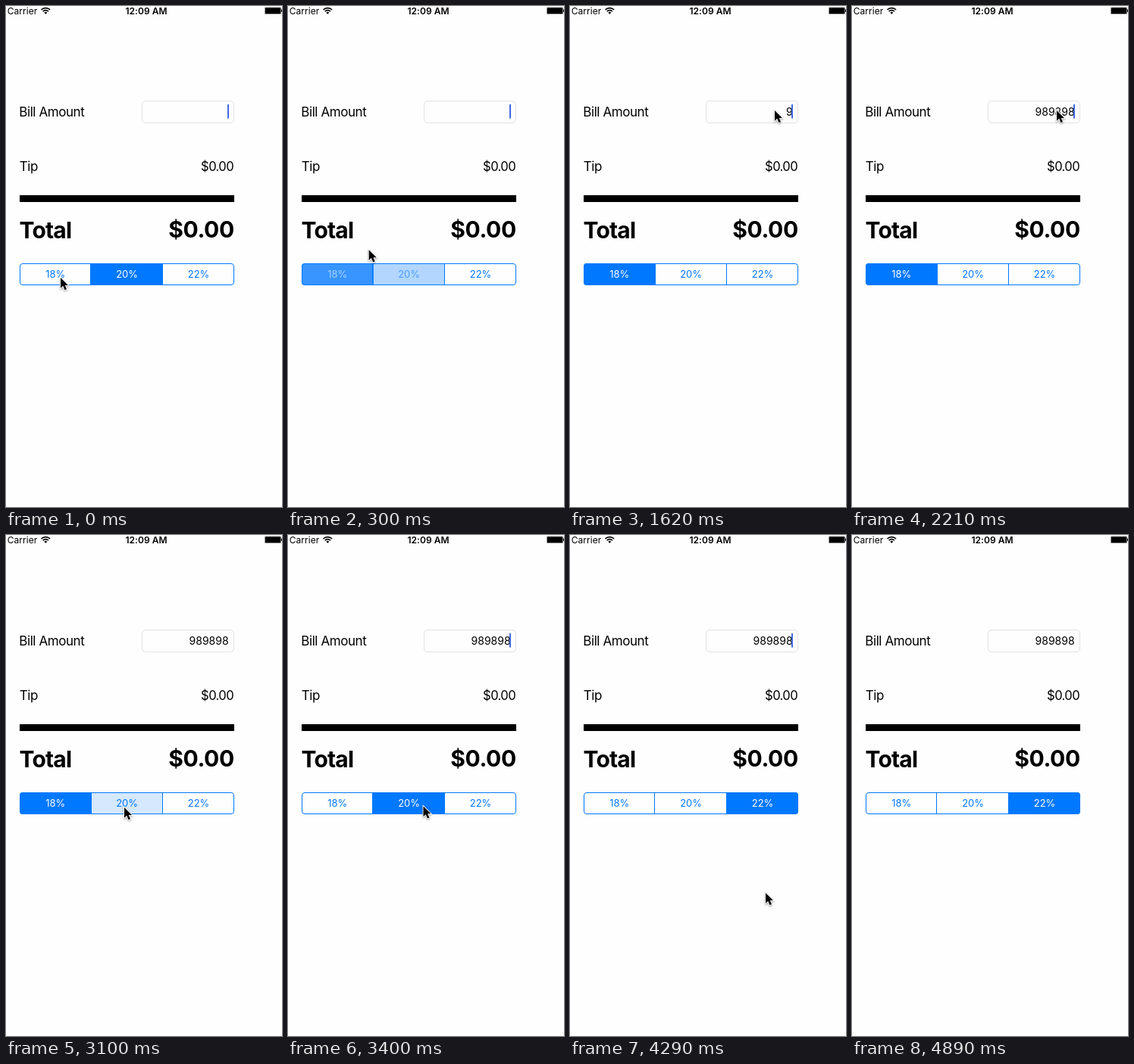
Recreate the animation shown at these times as an HTML page. Size 364x662 px, loop 4990 ms.

```html
<!DOCTYPE html>
<html lang="en">
<head>
<meta charset="utf-8">
<title>Tip calculator</title>
<style>
  html, body { margin: 0; width: 100%; height: 100%; overflow: hidden; background: #fefefe; }
  svg { display: block; width: 364px; height: 662px; font-family: Inter, Roboto, sans-serif; }
  .label { font-size: 17px; letter-spacing: -.43px; }
  .money { font-size: 16.6px; letter-spacing: -.6px; }
  .total { font-size: 30px; font-weight: 700; letter-spacing: -.8px; }
  .total.end { letter-spacing: -.4px; }
  .status { font-size: 12px; letter-spacing: .05px; }
  .end { text-anchor: end; }
  .mid { text-anchor: middle; }
  #segments text { font-size: 13px; letter-spacing: -.1px; }
  #pointer { filter: drop-shadow(0 1px 1px #0006); }
</style>
</head>
<body>
<svg viewBox="0 0 364 662">
  <clipPath id="round"><rect x="18" y="340" width="283" height="29" rx="4"/></clipPath>

  <text class="status" x="1.7" y="10.5">Carrier</text>
  <g fill="none" stroke="#000" stroke-width="1.7">
    <path d="M46.5 5A8.2 8.2 0 0 1 58.1 5M48.7 7.2A5.1 5.1 0 0 1 55.9 7.2"/>
    <path d="M52.3 10.8L50.3 8.8A2.8 2.8 0 0 1 54.3 8.8Z" fill="#000" stroke="none"/>
  </g>
  <text class="status mid" x="185" y="10.5" font-weight="600">12:09 AM</text>
  <rect x="341" y="1.5" width="22" height="9.5" rx="1.5" fill="#888"/>
  <rect x="342" y="2.5" width="20" height="7.5" rx=".5"/>
  <path d="M363 4.5h1v3.5h-1z"/>

  <text class="label" x="17.3" y="145.5">Bill Amount</text>
  <rect x="179.5" y="125.5" width="121" height="29" rx="4.5" fill="none" stroke="#e2e2e2"/>
  <text id="amount" class="end" x="293.6" y="144.8" font-size="14"></text>
  <rect id="caret" x="292" y="130" width="2" height="18.5" fill="#4169e1"/>

  <text class="label" x="17.8" y="217.5">Tip</text>
  <text class="money end" x="300.1" y="217.5">$0.00</text>
  <path d="M18 250h283v9H18z"/>
  <text class="total" x="17.5" y="307">Total</text>
  <text class="total end" x="300.8" y="306">$0.00</text>

  <g id="segments" clip-path="url(#round)"></g>
  <path d="M111.5 340v29M206.5 340v29" stroke="#0078ff"/>
  <rect x="18.5" y="340.5" width="282" height="28" rx="3.5" fill="none" stroke="#0078ff"/>

  <path id="pointer" d="M0 0V13.8L3.2 10.8L5.5 16.2L8 15.1L5.7 9.9H10Z"
        stroke="#fff" stroke-width="1.8" paint-order="stroke"/>
</svg>
<script>
const LOOP = 4990, TICK = 148.2, BLUE = '#0078ff';
const FIELD_TAP = 7, TYPED = 15;
const pressTicks = [1, 21, 25]; // when each segment, left to right, is pressed
const $ = id => document.getElementById(id);
const clamp = (v, lo, hi) => Math.max(lo, Math.min(hi, v));
const smooth = k => k * k * (3 - 2 * k);

// Each pointer move: from tick, to tick, and where it ends
const home = [72, 359];
const moves = [
  [1, 5, 294, 124], [5, 7, 270, 138], [15, 18, 246, 290],
  [18, 21, 156, 360], [21.8, 25, 227, 355], [27, 32, 315, 690]
];
const pointerAt = tick => moves.reduce(([x, y], [from, to, x1, y1]) => {
  const k = smooth(clamp((tick - from) / (to - from), 0, 1));
  return [x + (x1 - x) * k, y + (y1 - y) * k];
}, home);

const segments = [18, 20, 22].map((percent, i) => {
  const add = (tag, attrs) => {
    const el = document.createElementNS('http://www.w3.org/2000/svg', tag);
    for (const key in attrs) el.setAttribute(key, attrs[key]);
    return $('segments').appendChild(el);
  };
  const fill = add('rect', { x: 18 + 94 * i, y: 340, width: 95, height: 29, fill: BLUE });
  const text = add('text', { x: 65.2 + 94.4 * i, y: 359, class: 'mid' });
  text.textContent = percent + '%';
  return { fill, text };
});

// A press tints its segment, crossfades one tick later, then selects it
function paintSegments(tick) {
  let selected = 1, previous = -1;
  pressTicks.forEach((start, i) => {
    if (tick <= start) return;
    previous = tick === start + 1 ? selected : -1;
    selected = i;
  });
  segments.forEach(({ fill, text }, i) => {
    let alpha = 0, color = BLUE;
    if (i === selected) [alpha, color] = previous < 0 ? [1, '#fff'] : [.78, '#a5d0ff'];
    else if (i === previous) [alpha, color] = [.3, '#4b9fff'];
    else if (tick === pressTicks[i]) alpha = .16;
    fill.setAttribute('opacity', alpha);
    text.setAttribute('fill', color);
  });
}

// The caret stays lit while the field is in use, and blinks otherwise
function caretLit(tick) {
  const idle = tick < FIELD_TAP ? tick : Math.max(0, tick - TYPED);
  return idle % 7 < 4;
}

function draw(now) {
  const tick = Math.floor((now % LOOP + 15) / TICK);
  const typed = clamp(Math.round((tick - 10) * 1.2), 0, 6);
  $('amount').textContent = '98'.repeat(3).slice(0, typed);
  $('caret').setAttribute('opacity', +caretLit(tick));
  $('pointer').setAttribute('transform', `translate(${pointerAt(tick)})`);
  paintSegments(tick);
}

const start = performance.now();
function frame() {
  draw(performance.now() - start);
  requestAnimationFrame(frame);
}
frame();
</script>
</body>
</html>
```
